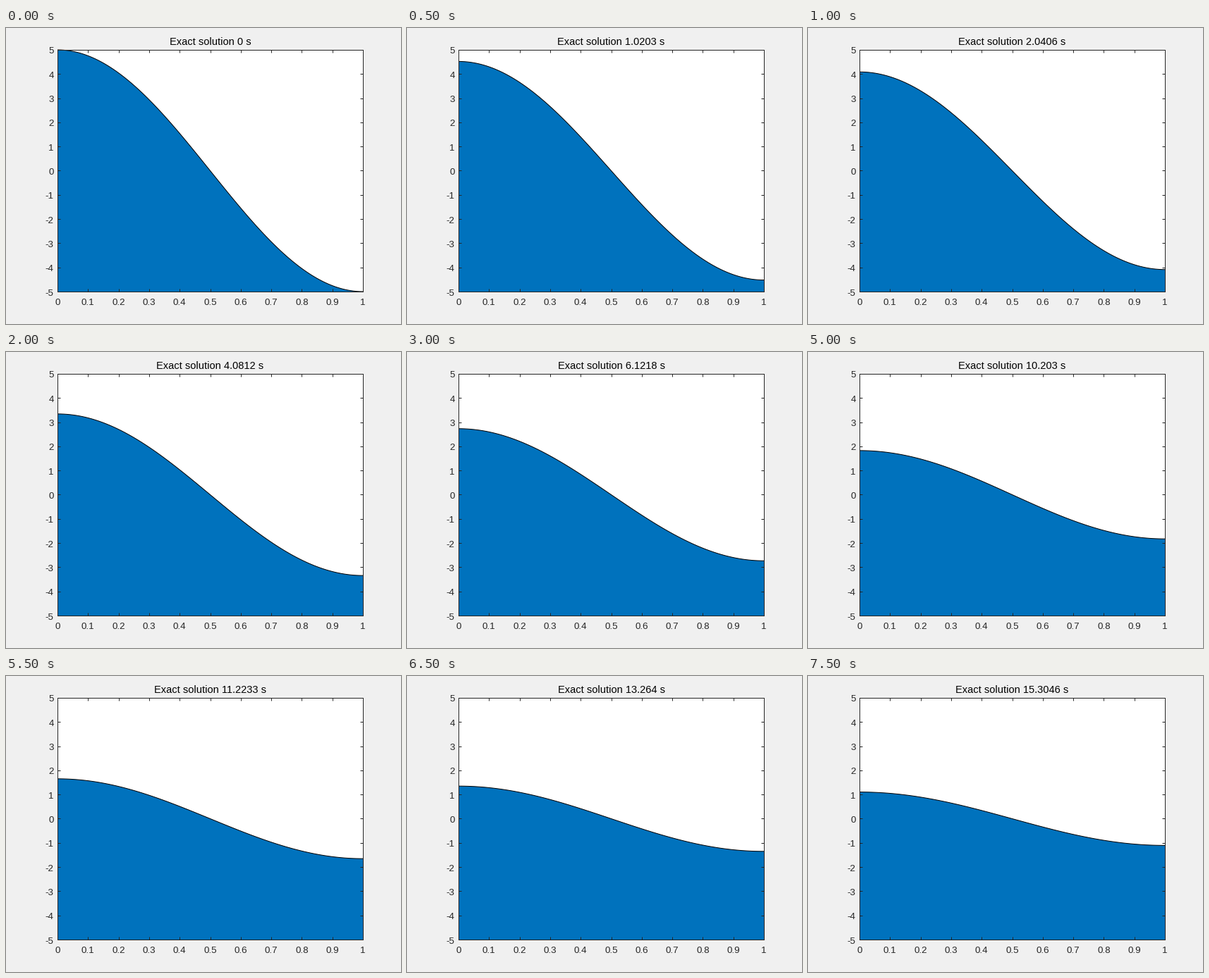
Write a matplotlib script that moves like this. It is 560 by 420 pixels and loops after 8 s.

```python
import numpy as np
import matplotlib.pyplot as plt
from matplotlib.animation import FuncAnimation

W, H, DPI = 560, 420, 100
PX = 72 / DPI  # points per pixel
LEFT, RIGHT, TOP, BOTTOM = 73, 506, 31, 374
FRAMES, INTERVAL = 16, 500
GREY = "#262626"
BLUE = "#0072BD"

plt.rcParams["font.family"] = "Liberation Sans"

x = np.linspace(0, 1, 100)
DIFFUSIVITY = 0.01
STEP = (x.size / (x.size - 1)) ** 2


def solution(t):
    return 5 * np.exp(-DIFFUSIVITY * np.pi**2 * t) * np.cos(np.pi * x)


def outline(y):
    return np.column_stack([np.r_[x, 1, 0], np.r_[y, -5, -5]])


def seconds(t):
    return f"{t:.{6 if t >= 10 else 5}g}"


fig = plt.figure(figsize=(W / DPI, H / DPI), dpi=DPI, facecolor="#F0F0F0")


def label(px, py, text, size=13.33, color=GREY, ha="center"):
    return fig.text(px / W, 1 - py / H, text, fontsize=size * PX,
                    color=color, ha=ha, va="baseline")


ax = fig.add_axes([LEFT / W, 1 - BOTTOM / H,
                   (RIGHT - LEFT) / W, (BOTTOM - TOP) / H])
ax.set(xlim=(0, 1), ylim=(-5, 5),
       xticks=np.arange(11) / 10, yticks=np.arange(-5, 6))
ax.set_axisbelow(False)
ax.tick_params(direction="in", top=True, right=True, length=4.4 * PX,
               width=PX, color=GREY, labelbottom=False, labelleft=False)
for spine in ax.spines.values():
    spine.set(color=GREY, linewidth=PX)

for i in range(11):
    label(LEFT + (RIGHT - LEFT) * i / 10, 393, f"{i / 10:g}")
    label(67.7, BOTTOM - (BOTTOM - TOP) * i / 10 + 5.5, str(i - 5), ha="right")

title = label((LEFT + RIGHT) / 2, 24, "", size=14.67, color="black")
area = ax.fill(x, solution(0), facecolor=BLUE, edgecolor="none", zorder=1)[0]
curve, = ax.plot(x, solution(0), color="black", linewidth=PX, zorder=2,
                 solid_capstyle="butt", clip_on=False)


def update(k):
    t = k * STEP
    y = solution(t)
    area.set_xy(outline(y))
    curve.set_ydata(y)
    title.set_text(f"Exact solution {seconds(t)} s")
    return area, curve, title


anim = FuncAnimation(fig, update, frames=FRAMES, interval=INTERVAL,
                     init_func=lambda: update(0), repeat=True, repeat_delay=0)
plt.show()
```
